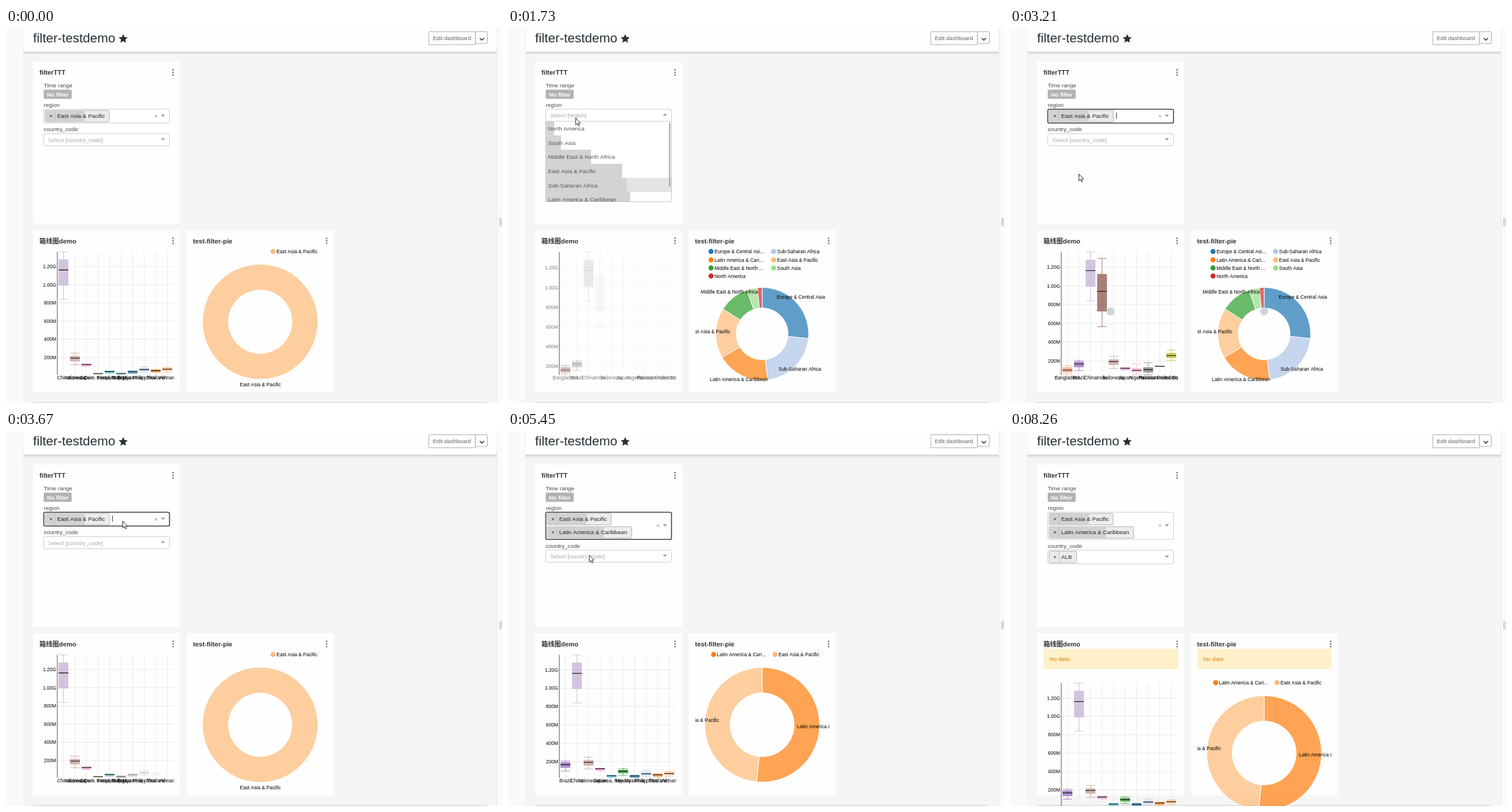
Recreate the animation shown at these times as an HTML page with a canvas. Size 860x651 px, loop 8340 ms.

```html
<!DOCTYPE html>
<html lang="en">
<head>
<meta charset="utf-8">
<title>filter-testdemo</title>
<style>
html, body { margin: 0; width: 100%; height: 100%; overflow: hidden; background: #f5f5f5; }
canvas { display: block; }
</style>
</head>
<body>
<canvas id="stage" width="860" height="651"></canvas>
<script>
const ctx = document.getElementById('stage').getContext('2d');
const LOOP = 8340, FADE = 250, NOTICE_SHIFT = 49;
const FONT = '"Liberation Sans", Arial, "Noto Sans CJK SC", "Noto Sans CJK", sans-serif';

// Whiskers and quartiles in millions: high, q3, median, q1, low
const COUNTRIES = {
  'Bangladesh': ['#ffa07a', 151, 133, 102, 77, 60],
  'Brazil': ['#9467bd', 206, 194, 167, 133, 98],
  'China': ['#c5b0d5', 1361, 1278, 1162, 991, 839],
  'India': ['#8c564b', 1292, 1126, 942, 728, 565],
  'Indonesia': ['#c49c94', 249, 217, 193, 157, 120],
  'Japan': ['#e377c2', 128, 127, 123, 111, 104],
  'Nigeria': ['#f7b6d2', 170, 126, 99, 77, 60],
  'Pakistan': ['#7f7f7f', 182, 133, 108, 77, 53],
  'Russian Federation': ['#c7c7c7', 149, 147, 142, 140, 138],
  'United States': ['#bcbd22', 317, 286, 258, 231, 206],
  'Korea, Dem. People’s Rep.': ['#dbdb8d', 26, 25, 23, 18, 15],
  'Korea, Rep.': ['#17becf', 51, 50, 45, 36, 28],
  'Malaysia': ['#9edae5', 31, 29, 23, 15, 11],
  'Mexico': ['#2ca02c', 124, 112, 95, 72, 50],
  'Myanmar': ['#1f77b4', 53, 50, 42, 32, 25],
  'Philippines': ['#aec7e8', 100, 83, 67, 50, 38],
  'Thailand': ['#ff7f0e', 67, 64, 56, 42, 35],
  'Vietnam': ['#ffbb78', 92, 89, 71, 52, 38]
};

const REGION_COLORS = {
  'Europe & Central Asia': '#1f77b4', 'Sub-Saharan Africa': '#aec7e8',
  'Latin America & Caribbean': '#ff7f0e', 'East Asia & Pacific': '#ffbb78',
  'Middle East & North Africa': '#2ca02c', 'South Asia': '#98df8a', 'North America': '#d62728'
};
const REGION_BARS = {
  'North America': 14, 'South Asia': 26, 'Middle East & North Africa': 78, 'East Asia & Pacific': 132,
  'Sub-Saharan Africa': 140, 'Latin America & Caribbean': 146, 'Europe & Central Asia': 152
};
const EAST = 'East Asia & Pacific', LATIN = 'Latin America & Caribbean';

const SCENES = {
  east: {
    zero: 603.6, scale: 0.158,
    countries: ['China', 'Indonesia', 'Japan', 'Korea, Dem. People’s Rep.', 'Korea, Rep.', 'Malaysia',
      'Myanmar', 'Philippines', 'Thailand', 'Vietnam'],
    cy: 510, outer: 99.5, inner: 55.5,
    slices: [[EAST, 360]],
    labels: [[EAST, 405.5, 621.5]],
    legend: [[EAST, 463, 388]]
  },
  all: {
    zero: 610.6, scale: 0.163,
    countries: ['Bangladesh', 'Brazil', 'China', 'India', 'Indonesia', 'Japan', 'Nigeria', 'Pakistan',
      'Russian Federation', 'United States'],
    cy: 531, outer: 80.5, inner: 45,
    slices: [['Europe & Central Asia', 95.7], ['Sub-Saharan Africa', 173.2], [LATIN, 239.5], [EAST, 302.5],
      ['Middle East & North Africa', 340.8], ['South Asia', 354], ['North America', 360]],
    labels: [['Europe & Central Asia', 466, 470], ['Sub-Saharan Africa', 469, 595], [LATIN, 350, 613],
      [EAST, 314.5, 530], ['Middle East & North Africa', 334, 461]],
    legend: [['Europe & Central Asia', 352, 388], ['Sub-Saharan Africa', 460.5, 388], [LATIN, 352, 402.5],
      [EAST, 460.5, 402.5], ['Middle East & North Africa', 352, 416.5], ['South Asia', 460.5, 416.5],
      ['North America', 352, 430.5]]
  },
  both: {
    zero: 605.9, scale: 0.1595,
    countries: ['Brazil', 'China', 'Indonesia', 'Japan', 'Korea, Rep.', 'Mexico', 'Myanmar', 'Philippines',
      'Thailand', 'Vietnam'],
    cy: 510, outer: 99.5, inner: 55.5,
    slices: [[LATIN, 185.5], [EAST, 360]],
    labels: [[LATIN, 501, 516], [EAST, 295, 505]],
    legend: [[LATIN, 356.5, 388], [EAST, 463, 388]]
  }
};

const PIE_TIMES = [[-999, 'east'], [1360, 'all'], [3420, 'east'], [4940, 'both']];
const BOX_TIMES = [[-999, 'east'], [1605, 'all'], [3420, 'east'], [4940, 'both']];
const POINTER = [[70, 663, 600], [830, 74, 151], [1250, 74, 151], [1600, 117, 156], [1850, 117, 156],
  [2500, 119, 253], [3240, 119, 253], [3620, 202, 156], [3900, 202, 156], [4340, 160, 190],
  [4540, 157, 275], [5050, 157, 275], [5500, 140, 213], [5700, 140, 213], [6140, 128, 335],
  [6310, 127, 336], [7380, 127, 336], [7790, 760, 655]];

const clamp = v => Math.min(1, Math.max(0, v));
const ease = v => (v = clamp(v)) < 0.5 ? 4 * v ** 3 : 1 - 4 * (1 - v) ** 3;
const within = (t, from, to) => t >= from && t < to;
const latest = (times, t) => times.filter(([start]) => start <= t).pop();

function text(s, x, y, { size = 9.87, color = '#484848', bold = false, align = 'left' } = {}) {
  ctx.font = `${bold ? 'bold ' : ''}${size}px ${FONT}`;
  ctx.fillStyle = color;
  ctx.textAlign = align;
  ctx.fillText(s, x, y);
}

function rect(x, y, w, h, color) {
  ctx.fillStyle = color;
  ctx.fillRect(x, y, w, h);
}

function line(x1, y1, x2, y2, color, width = 0.8) {
  ctx.strokeStyle = color;
  ctx.lineWidth = width;
  ctx.beginPath();
  ctx.moveTo(x1, y1);
  ctx.lineTo(x2, y2);
  ctx.stroke();
}

function shape(points, fill, stroke, width = 1) {
  ctx.beginPath();
  points.forEach(([x, y]) => ctx.lineTo(x, y));
  ctx.closePath();
  if (fill) { ctx.fillStyle = fill; ctx.fill(); }
  if (stroke) { ctx.strokeStyle = stroke; ctx.lineWidth = width; ctx.stroke(); }
}

function panel(x, y, w, h, radius, fill, stroke, width = 1) {
  ctx.beginPath();
  ctx.roundRect(x, y, w, h, radius);
  ctx.fillStyle = fill;
  ctx.fill();
  ctx.strokeStyle = stroke;
  ctx.lineWidth = width;
  ctx.stroke();
}

function dot(x, y, r, color) {
  ctx.fillStyle = color;
  ctx.beginPath();
  ctx.arc(x, y, r, 0, 7);
  ctx.fill();
}

function clipped(x, y, w, h, draw) {
  ctx.save();
  ctx.beginPath();
  ctx.rect(x, y, w, h);
  ctx.clip();
  draw();
  ctx.restore();
}

function card(x, y, h, title) {
  rect(x, y, 255, h, '#fefefe');
  text(title, x + 11, y + 22.5, { size: 11.28, bold: true, color: '#323232' });
  for (let i = -1; i < 2; i++) dot(x + 242.7, y + 18.5 + i * 4.6, 1.5, '#808080');
}

function drawPage() {
  rect(0, 0, 860, 651, '#f5f5f5');
  rect(0, 0, 30, 651, '#fafafa');
  rect(852, 0, 8, 651, '#fafafa');
  line(30.5, 0, 30.5, 651, '#f0f0f0');
  line(851.5, 0, 851.5, 651, '#e6e6e6');
  const shadow = ctx.createLinearGradient(0, 41, 0, 47);
  shadow.addColorStop(0, '#d0d0d0');
  shadow.addColorStop(1, '#f5f5f5');
  rect(30, 41, 821, 6, shadow);
  rect(31, 0, 820, 41, '#fefefe');
  text('filter-testdemo', 47, 25.3, { size: 22.5, color: '#263238' });
  const star = Array.from({ length: 10 }, (_, i) => {
    const a = i * Math.PI / 5, r = i % 2 ? 3.9 : 8.2;
    return [203.2 + r * Math.sin(a), 18.8 - r * Math.cos(a)];
  });
  shape(star, '#263238');
  panel(733, 6.5, 81, 22.5, 1, '#fefefe', '#a8a8a8');
  panel(814, 6.5, 20.5, 20.5, 1, '#fefefe', '#a8a8a8');
  text('Edit dashboard', 740, 21.3, { color: '#606060' });
  line(821.6, 17.6, 825.3, 21.3, '#444', 1.8);
  line(824.7, 21.3, 829, 17.3, '#444', 1.8);
  line(856, 330, 856, 344, '#aaa', 1);
  line(858.5, 330, 858.5, 344, '#aaa', 1);
  rect(47, 649.5, 787, 1, '#d0d0d0');
  card(47, 58.5, 281.5, 'filterTTT');
  card(47, 351, 281.5, '箱线图demo');
  card(313.3, 351, 281.5, 'test-filter-pie');
}

function fadedColor(hex, p) {
  const rgb = [1, 3, 5].map(i => Math.round(parseInt(hex.slice(i, i + 2), 16) * p));
  return `rgb(${rgb})`;
}

function drawBoxPlot(t) {
  const [start, name] = latest(BOX_TIMES, t);
  const { zero, scale, countries } = SCENES[name];
  const progress = (t - start) / FADE, axis = ease(progress);
  const y = v => zero - v * scale;
  const label = { size: 8.46, color: '#000' };

  ctx.globalAlpha = axis;
  for (let v = 200; v <= 1200; v += 200) {
    const tick = y(v) + (1 - axis) * (22.2 - 0.016 * v);
    line(89, tick, 291, tick, '#e4e4e4');
    text(v < 1000 ? v + 'M' : (v / 1000).toFixed(2) + 'G', 87, tick + 3, { ...label, align: 'right' });
  }
  countries.forEach((country, i) => {
    const x = 99.6 + i * 20;
    line(x, 388, x, 602, '#e4e4e4');
    text(country, x, 610, { ...label, align: 'center' });
  });
  ctx.globalAlpha = 1;
  line(89, 388.5, 89, 602, '#666', 1.2);

  countries.forEach((country, i) => {
    const p = ease(progress - i / countries.length);
    if (!p) return;
    const [base, ...values] = COUNTRIES[country];
    const color = fadedColor(base, p), x = 99.6 + i * 20;
    const [high, q3, median, q1, low] = values.map(y);
    ctx.globalAlpha = p;
    for (const [cap, edge] of [[high, q3], [low, q1]]) {
      line(x - 8, cap, x + 8, cap, color);
      line(x, cap, x, edge, color);
    }
    ctx.globalAlpha = p * 0.75;
    rect(x - 8.5, q3, 17, q1 - q3, color);
    ctx.globalAlpha = p;
    line(x - 8.5, median, x + 8.5, median, '#222', 1.3);
  });
  ctx.globalAlpha = 1;
}

function drawPie(t) {
  const [start, name] = latest(PIE_TIMES, t);
  const { cy, outer, inner, slices, labels, legend } = SCENES[name];
  const sweep = ease((t - start) / FADE), cx = 440.7;
  const angle = deg => deg * sweep * Math.PI / 180 - Math.PI / 2;
  let from = 0;
  for (const [region, to] of slices) {
    ctx.beginPath();
    ctx.arc(cx, cy, outer, angle(from), angle(to));
    ctx.arc(cx, cy, inner, angle(to), angle(from), true);
    ctx.closePath();
    ctx.globalAlpha = 0.7;
    ctx.fillStyle = REGION_COLORS[region];
    ctx.fill();
    ctx.globalAlpha = 1;
    if (slices.length > 1) {
      ctx.strokeStyle = '#fff';
      ctx.lineWidth = 1;
      ctx.stroke();
    }
    from = to;
  }
  const style = { size: 8.46, color: '#000' };
  for (const [region, x, y] of labels) text(region, x, y, style);
  for (const [region, x, y] of legend) {
    dot(x, y, 4.4, REGION_COLORS[region]);
    text(region.length > 20 ? region.slice(0, 20) + '...' : region, x + 6, y + 3, style);
  }
}

function drawCharts(t) {
  const notice = t >= 7150;
  for (const [x, w, draw] of [[58, 233.5, drawBoxPlot], [324.8, 232.5, drawPie]]) {
    clipped(x, 378, w, 273, () => {
      ctx.translate(0, notice ? NOTICE_SHIFT : 0);
      draw(t);
    });
    if (notice) {
      rect(x, 378, w, 35, '#fff0c9');
      text('No data', x + 10.7, 399, { color: '#cf7d10' });
    }
  }
  const waiting = within(t, 2660, 3420) || within(t, 4640, 4940) || within(t, 6690, 7150);
  if (waiting || within(t, 960, 1605)) dot(174.5, 492, 7, '#cdd6da');
  if (waiting || within(t, 960, 1360)) dot(440.7, 492, 7, '#cdd6da');
}

const selectHeight = tags => [21, 24, 47.2][tags.length];

function drawSelect(y, tags, field, { open, focus, clearable }) {
  const h = selectHeight(tags), mid = y + h / 2;
  panel(65.5, y, 218, h, 2.8, '#fff', focus ? '#3a3a3a' : '#ccc', focus ? 1.6 : 1);
  if (!tags.length) text(`Select [${field}]`, 73, y + 14, { color: '#a8a8a8' });
  tags.forEach((tag, i) => {
    const top = y + 2 + 23 * i;
    const width = { [EAST]: 111, [LATIN]: 146.5 }[tag] || 47.5;
    const share = { [EAST]: 68, [LATIN]: 98 }[tag] || 0;
    panel(68, top, width, 20, 1.4, '#ececec', '#a9a9a9', 0.9);
    rect(68.5, top + 0.5, share, 19, '#d2d2d2');
    line(85, top, 85, top + 20, '#b4b4b4');
    text('×', 78, top + 13.3, { align: 'center', color: '#222' });
    text(tag, 88.7, top + 13.4, { color: '#222' });
  });
  if (clearable && tags.length) text('×', 260, mid + 3.8, { size: 11, color: '#999', align: 'center' });
  const dir = open ? -1 : 1, base = mid - 1 - dir * 1.5;
  shape([[268.4, base], [275.8, base], [272.1, base + dir * 3.8]], '#999');
}

function drawOptions(top, options, bars, active) {
  clipped(65, top, 220, 140, () => {
    rect(65.5, top, 218.5, 139.5, '#fff');
    options.forEach((option, i) => {
      const y = top + i * 24.6;
      if (i === active) rect(66, y, 218, 24.6, '#e4e4e4');
      if (bars) rect(66, y, bars[option], 24.6, '#d3d3d3');
      text(option, 69.5, y + 16.2, { color: '#555' });
    });
    if (bars) panel(279.4, top + 2.5, 1.8, 111, 1, '#a8a8a8', '#a8a8a8', 0.5);
    ctx.strokeStyle = '#c4c4c4';
    ctx.lineWidth = 1;
    ctx.strokeRect(65.5, top, 218, 139.5);
  });
}

function drawFilters(t, pointer) {
  const regions = t < 960 ? [EAST] : t < 2660 ? [] : t < 4640 ? [EAST] : [EAST, LATIN];
  const codes = t < 6690 ? [] : ['ALB'];
  const regionOpen = within(t, 1500, 2660) || within(t, 3800, 4640);
  const codeOpen = within(t, 5640, 6690);
  const regionFocus = within(t, 2660, 3800) || within(t, 4640, 5640);
  const codeFocus = within(t, 6690, 8260);
  const top = 141, bottom = top + selectHeight(regions), codeTop = bottom + 18.5;

  text('Time range', 65.5, 103);
  panel(65.8, 107.3, 47.7, 15.4, 1, '#b2b2b2', '#b2b2b2', 0.6);
  text('No filter', 71, 118.5, { bold: true, color: '#fff' });
  text('region', 65.5, 137.3);
  text('country_code', 65.5, bottom + 14.3);
  drawSelect(codeTop, codes, 'country_code', { open: codeOpen, focus: codeFocus });
  drawSelect(top, regions, 'region', { open: regionOpen, focus: regionFocus, clearable: true });

  if (within(t, 2660, 3800)) rect(184, 146.5, 1, 11, '#333');
  if (codeOpen) rect(73, codeTop + 4.5, 1, 11, '#333');
  if (codeFocus && Math.floor((t - 7500) / 530) % 2 === 0) rect(120, 211, 1, 12, '#333');

  if (regionOpen) {
    const hovered = Math.floor((pointer[1] - bottom) / 24.6);
    const options = Object.keys(REGION_BARS).filter(r => !regions.includes(r));
    drawOptions(bottom, options, REGION_BARS, hovered >= 0 ? hovered : regions.length ? 0 : 4);
  }
  if (codeOpen) drawOptions(codeTop + 21, ['ABW', 'ADO', 'AFG', 'AGO', 'ALB', 'ARE'], null, 0);
}

function pointerAt(t) {
  const next = POINTER.findIndex(([time]) => time > t);
  if (next < 1) return null;
  const [t0, x0, y0] = POINTER[next - 1], [t1, x1, y1] = POINTER[next];
  const p = clamp((t - t0) / (t1 - t0)), s = p * p * (3 - 2 * p);
  return [x0 + (x1 - x0) * s, y0 + (y1 - y0) * s];
}

function drawPointer([x, y]) {
  const arrow = [[0, 0], [0, 11.8], [2.7, 9.4], [4.6, 13.4], [6.4, 12.6], [4.6, 8.7], [8.2, 8.5]];
  shape(arrow.map(([dx, dy]) => [x + 0.5 + dx, y + 0.5 + dy]), '#fff', '#222', 1);
}

function frame() {
  const t = performance.now() % LOOP;
  const pointer = pointerAt(t);
  drawPage();
  drawCharts(t);
  drawFilters(t, pointer);
  if (pointer) drawPointer(pointer);
  requestAnimationFrame(frame);
}
frame();
</script>
</body>
</html>
```
